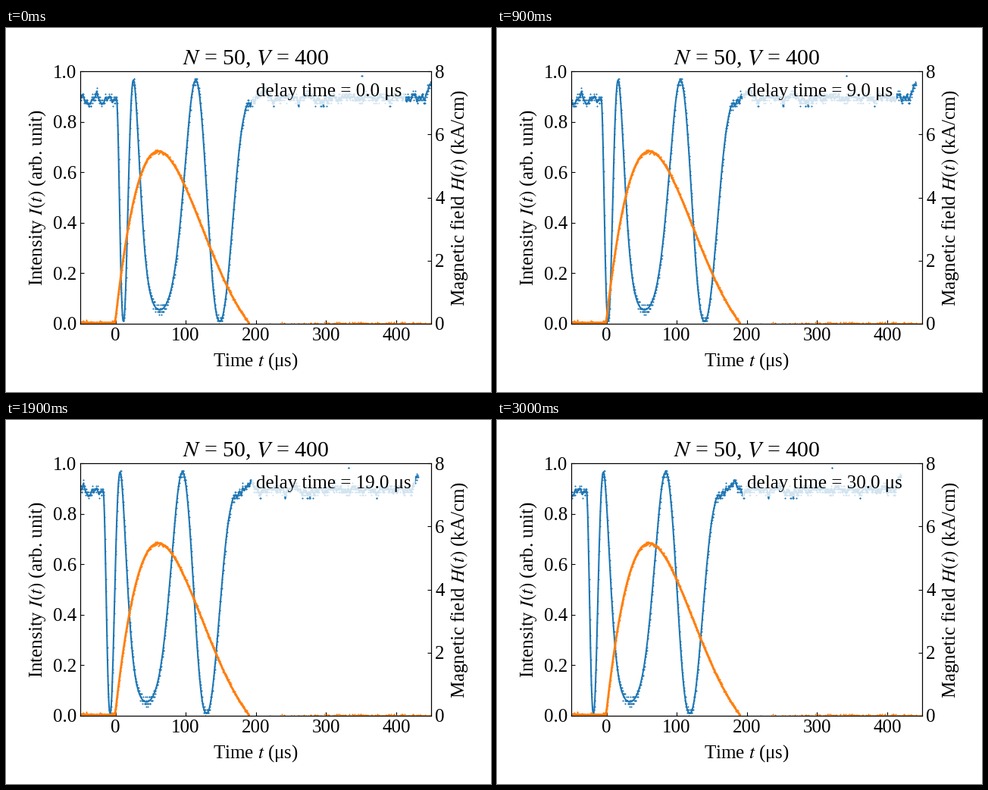
Animation of 640 by 480 pixels, one loop 3.1 s. Source, as a matplotlib script:

```python
import numpy as np
import matplotlib.pyplot as plt
from matplotlib.animation import FuncAnimation

plt.rcParams.update({
    "font.family": "Liberation Serif",
    "mathtext.fontset": "stix",
    "font.size": 18,
    "xtick.direction": "in",
    "ytick.direction": "in",
})

W, H = 640, 480
BLUE, ORANGE = "C0", "C1"
FRAMES, INTERVAL = 31, 100
LAG, PULSE = 2, 192
rng = np.random.default_rng(5)


def field(t):
    """Damped half-sine pulse in kA/cm."""
    s = t + 0.7
    pulse = 12.17 * np.exp(-0.01027 * s) * np.sin(np.pi * s / PULSE)
    return np.where((s > 0) & (s < PULSE), pulse, 0)


def transmitted(t):
    """Light intensity, following the field with a short lag."""
    h = field(t - LAG)
    phase = np.pi * (0.5501 * h + 0.00964 * h**2 - 0.0028 * h**3)
    wave = ((1 + np.cos(phase)) / 2) ** 1.12
    return 0.01 + (0.882 + 0.02 * h) * wave


def bump(t, centre, width):
    return np.exp(-((t - centre) / width) ** 2)


def drift(t):
    """Slow wander of the baseline outside the pulse."""
    window = np.hanning(13)
    noise = np.convolve(rng.normal(0, 0.009, t.size), window, mode="same")
    noise /= np.sqrt(np.sum(window**2))
    ripple = np.where(t < 0, 0.011 * np.cos(2 * np.pi * (t + 12) / 18), 0)
    quiet = np.clip(t / -4, 0, 1) + np.clip((t - 180) / 15, 0, 1)
    return (quiet * (noise + ripple) - 0.02 * bump(t, 194, 8)
            + 0.03 * bump(t, 213, 6) + 0.055 * bump(t, 450, 7))


def quantize(v, step):
    return np.round(v / step) * step


t = np.arange(-50, 450.1, 0.4)

# Intensity: smooth curve and digitised samples
curve = transmitted(t) + drift(t)
raw = curve + rng.normal(0, 0.008, t.size) + 0.09 * bump(t, 351, 0.5)
samples = np.abs(quantize(raw, 0.0123))
samples = np.where(t > 195, np.maximum(samples, 0.861), samples)

# Field: offset is positive before the pulse and slightly negative after it
after = -0.02 - 0.06 * np.exp(-(t - 190) / 60)
h_curve = field(t) + np.select([t < 0, t > 190], [0.03, after], 0)
h_samples = quantize(h_curve + rng.normal(0, 0.03, t.size), 0.02)

fig, ax = plt.subplots(figsize=(W / 100, H / 100), dpi=100)
fig.subplots_adjust(left=98.2 / W, right=561.2 / W,
                    bottom=90 / H, top=1 - 57.2 / H)
ax2 = ax.twinx()

dots = dict(ls="none", marker="+", ms=2, mew=0.8)
i_dots, = ax.plot(t, samples, color=BLUE, **dots)
i_line, = ax.plot(t, curve, color=BLUE, lw=1.5)
ax2.plot(t, h_samples, color=ORANGE, **dots)
ax2.plot(t, h_curve, color=ORANGE, lw=2)

ax.set(xlim=(-50, 450), ylim=(0, 1), xticks=range(0, 401, 100))
ax2.set(ylim=(0, 8), yticks=range(0, 9, 2))
ax.set_xlabel("Time $t$ (μs)", labelpad=7)
ax.set_ylabel("Intensity $I(t)$ (arb. unit)", labelpad=5)
ax2.set_ylabel("Magnetic field $H(t)$ (kA/cm)", labelpad=5)
ax.set_title("$N$ = 50, $V$ = 400")
label = ax.text(200, 0.9, "",
                bbox=dict(facecolor="white", edgecolor="none", alpha=0.8))


def update(delay):
    i_dots.set_xdata(t - delay)
    i_line.set_xdata(t - delay)
    label.set_text(f"delay time = {delay:.1f} μs")
    return i_dots, i_line, label


anim = FuncAnimation(fig, update, frames=FRAMES, interval=INTERVAL,
                     repeat=True, repeat_delay=0)
plt.show()
```
